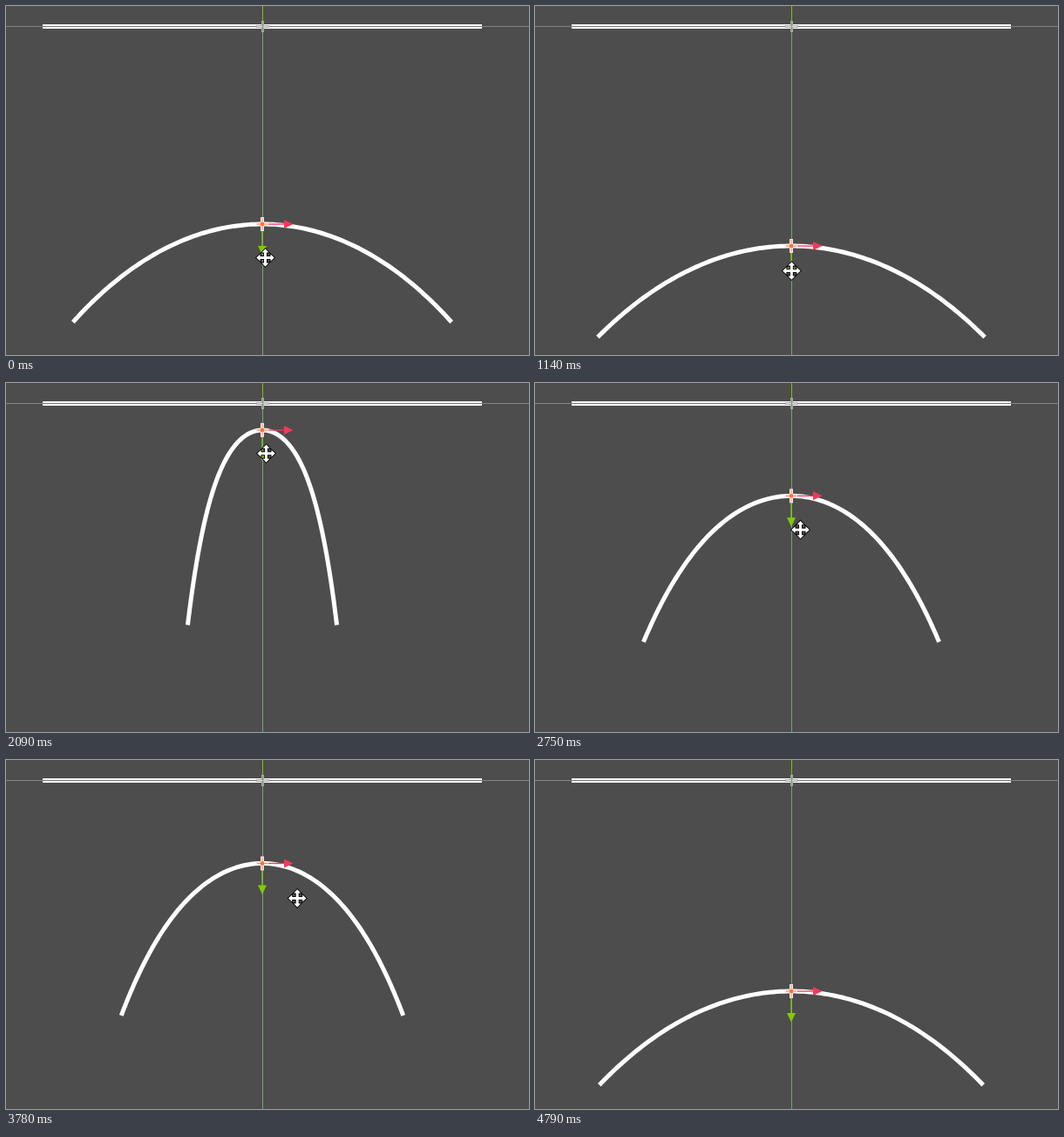
An HTML page with a canvas for the animation above (5.29 s loop, 600 by 400 pixels).

```html
<!DOCTYPE html>
<html>
<head>
<meta charset="utf-8">
<style>
  html, body { margin: 0; width: 100%; height: 100%; overflow: hidden; background: #4d4d4d; }
  canvas { display: block; }
</style>
</head>
<body>
<canvas id="stage" width="600" height="400"></canvas>
<script>
const ctx = document.getElementById('stage').getContext('2d');
const LOOP = 5290, CX = 294, AXIS_Y = 23.5, HALF = 252;
const GREEN = '#84c80c', RED = '#f5385a';

// Tracks are [time in ms, value] pairs.
const apexTrack = [
  [740, 250], [1140, 275], [1300, 275], [1810, 84.5], [2090, 54], [2320, 44],
  [2410, 44], [2600, 65], [2750, 129], [2815, 148], [2990, 64], [3235, 178],
  [3400, 124], [3550, 59], [3990, 203.5], [4110, 240], [4440, 265]
];
const cursorXTrack = [
  [30, 297.5], [170, 297], [320, 297], [460, 294], [1300, 294.5], [2090, 298.5],
  [2410, 299], [2750, 304.5], [3400, 321.5], [4110, 340.5], [4440, 338.5],
  [4600, 338.5], [4790, 548]
];
const hoverYTrack = [[30, 288.5], [170, 282.5], [320, 282.5], [460, 278.5]];
const leaveYTrack = [[4110, 0], [4440, -4], [4600, -4], [4790, 122]];

// Monotone cubic interpolation: smooth, and flat at every turning point.
function sample(track, t) {
  const last = track.length - 1;
  if (t <= track[0][0]) return track[0][1];
  if (t >= track[last][0]) return track[last][1];
  const slope = i => (track[i + 1][1] - track[i][1]) / (track[i + 1][0] - track[i][0]);
  const tangent = i => {
    if (i === 0 || i === last) return 0;
    const a = slope(i - 1), b = slope(i);
    return a * b > 0 ? 2 * a * b / (a + b) : 0;
  };
  let i = 0;
  while (track[i + 1][0] < t) i++;
  const [t0, v0] = track[i], [t1, v1] = track[i + 1];
  const h = t1 - t0, u = (t - t0) / h, w = 1 - u;
  return v0 * w * w * (1 + 2 * u) + v1 * u * u * (3 - 2 * u)
    + h * u * w * (w * tangent(i) - u * tangent(i + 1));
}

function rect(color, x, y, w, h) {
  ctx.fillStyle = color;
  ctx.fillRect(x, y, w, h);
}

function polygon(points) {
  ctx.beginPath();
  points.forEach(([x, y]) => ctx.lineTo(x, y));
  ctx.closePath();
}

function drawAxes() {
  rect('#4d4d4d', 0, 0, 600, 400);
  rect('#828282', 0, 23, 600, 1);
  rect('#fff', 42, 21, 504, 5);
  rect('#777', 42, 23, 504, 1);
  rect('#6fa77b', CX, 24, 1, 376);
  rect('#80bd0c', CX, 0, 1, 23);
  rect('#aaa', CX - 7, 22, 15, 3);
  rect('#aaa', CX - 1, 17, 3, 13);
  rect('#e4e4dc', CX - 6, 23, 13, 1);
  rect('#80a070', CX, 18, 1, 11);
}

// Catenary of fixed arc length whose directrix is the top line.
function drawCatenary(apex) {
  const a = apex - AXIS_Y;
  ctx.beginPath();
  for (let i = -60; i <= 60; i++) {
    const s = i / 60 * HALF;
    ctx.lineTo(CX + a * Math.asinh(s / a), AXIS_Y + Math.hypot(a, s));
  }
  ctx.strokeStyle = '#fff';
  ctx.lineWidth = 5;
  ctx.stroke();
}

function drawArrow(color, angle) {
  ctx.save();
  ctx.rotate(angle);
  rect(color, 0, -0.6, 26, 1.3);
  polygon([[25, -5], [35.5, 0], [25, 5]]);
  ctx.fill();
  ctx.restore();
}

function drawGizmo(apex) {
  ctx.save();
  ctx.translate(CX, apex);
  drawArrow(RED, 0);
  drawArrow(GREEN, Math.PI / 2);
  rect('#ffe3da', -7, -1.5, 14, 3);
  rect('#ffe3da', -2, -8, 4, 16);
  rect('#ff8a65', -6, -0.5, 12, 1);
  rect('#e8a080', -0.5, -7, 1, 14);
  rect('#ff7043', -2, -2, 4, 4);
  ctx.restore();
}

function drawCursor(x, y) {
  const arm = [[-1.5, -1.5], [-1.5, -6], [-4, -6], [0, -10.3], [4, -6], [1.5, -6]];
  const points = [];
  for (let k = 0; k < 4; k++) {
    const c = [1, 0, -1, 0][k], s = [0, 1, 0, -1][k];
    arm.forEach(([px, py]) => points.push([px * c - py * s, px * s + py * c]));
  }
  ctx.save();
  ctx.translate(x, y);
  polygon(points);
  ctx.lineWidth = 1.8;
  ctx.strokeStyle = '#000';
  ctx.stroke();
  ctx.fillStyle = '#fff';
  ctx.fill();
  ctx.restore();
}

function draw(now) {
  const t = now % LOOP;
  const apex = sample(apexTrack, t);
  drawAxes();
  drawCatenary(apex);
  drawGizmo(apex);
  if (t < 4790) {
    // The pointer runs slightly ahead of the handle it drags.
    const y = t < 700
      ? sample(hoverYTrack, t)
      : sample(apexTrack, t + 27) + 28.5 + sample(leaveYTrack, t);
    drawCursor(sample(cursorXTrack, t), y);
  }
  requestAnimationFrame(() => draw(performance.now()));
}
draw(0);
</script>
</body>
</html>
```
